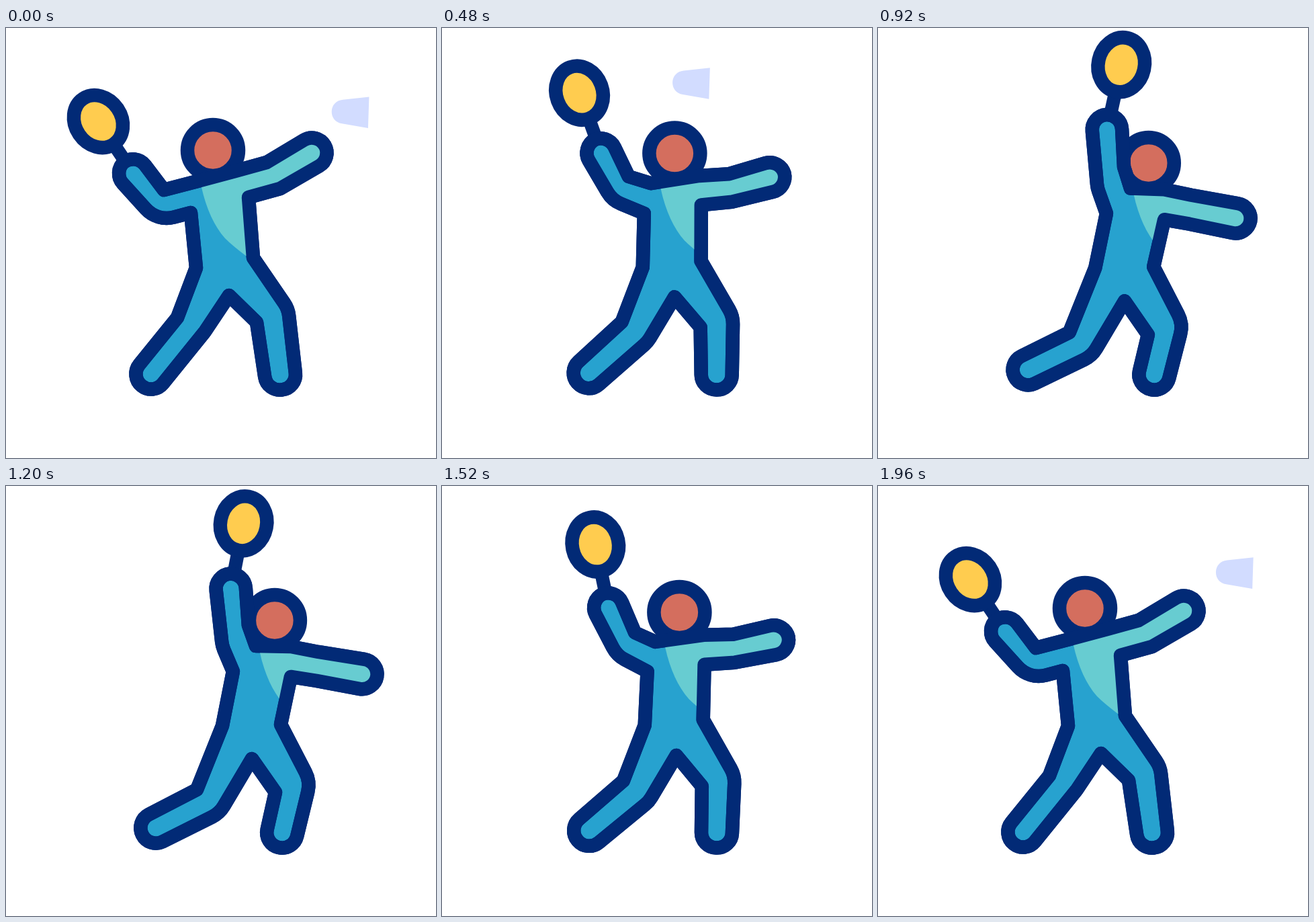
An HTML page with a canvas for the animation above (2 s loop, 640 by 640 pixels).

```html
<!DOCTYPE html>
<html lang="en">
<head>
<meta charset="utf-8">
<title>Badminton smash</title>
<style>
html, body { margin: 0; width: 100%; height: 100%; overflow: hidden; background: #fff; }
canvas { display: block; }
</style>
</head>
<body>
<canvas id="stage" width="640" height="640"></canvas>
<script>
const ctx = document.getElementById('stage').getContext('2d');
const NAVY = '#022a76', BLUE = '#27a2cf', TEAL = '#67ccd1';
const SKIN = '#d46e5e', YELLOW = '#ffcc4f', PALE = '#d2dcff';
const LOOP = 2000, LINE = 20.5, LIMB = 22.6;

// Body outline, clockwise from the inner racket elbow; then head and shade origin.
const READY = [235,241, 285,228, 341,213, 388,200, 455,186, 408,239, 361,252, 368,342,
  420,418, 408,516, 373,438, 332,398, 296,452, 216,515, 255,431, 283,357, 275,275,
  225,288, 190,217, 308,182, 291,237];
const SWING = [288,218, 318,232, 390,222, 434,221, 494,230, 436,263, 391,266, 389,348,
  436,431, 409,516, 387,447, 349,401, 308,470, 219,513, 270,439, 302,356, 306,276,
  261,252, 249,181, 354,188, 333,241];
const REACH = [361,207, 372,238, 424,239, 465,247, 530,280, 462,290, 424,284, 409,355,
  453,440, 411,516, 401,456, 366,406, 318,487, 223,509, 284,452, 322,357, 338,276,
  322,238, 335,153, 400,200, 378,248];
const VERTS = 19, HAND = 18, HEAD = 19, SHADE = 20;
const CAPS = [4, 9, 13, HAND];    // hands and feet, given by their centres
const ROUND = [8, 12, 17];        // softly bent knees and elbow

const ease = (t, from, to) => {
  const u = Math.min(1, Math.max(0, (t - from) / (to - from)));
  return u * u * (3 - 2 * u);
};
const swing = t => 1.03 * (ease(t, 180, 870) - ease(t, 1120, 1900));

// Curve through the three poses
function poseAt(q) {
  const a = (1 - q) * (1 - 2 * q), b = 4 * q * (1 - q), c = q * (2 * q - 1);
  const at = i => READY[i] * a + SWING[i] * b + REACH[i] * c;
  return Array.from({ length: READY.length / 2 }, (_, i) => [at(2 * i), at(2 * i + 1)]);
}

function bodyPath(pose) {
  const corners = [];
  for (let i = 0; i < VERTS; i++) {
    const [x, y] = pose[i];
    if (!CAPS.includes(i)) {
      corners.push([x, y, ROUND.includes(i) ? 42 : 0]);
      continue;
    }
    const p = pose[i - 1], n = pose[(i + 1) % VERTS];
    const ang = Math.atan2(y - (p[1] + n[1]) / 2, x - (p[0] + n[0]) / 2);
    const dx = Math.cos(ang) * LIMB, dy = Math.sin(ang) * LIMB;
    corners.push([x + dx + dy, y + dy - dx, LIMB], [x + dx - dy, y + dy + dx, LIMB]);
  }
  const path = new Path2D();
  path.moveTo(corners[0][0], corners[0][1]);
  corners.slice(1).forEach(([x, y, r], i) => {
    const next = corners[(i + 2) % corners.length];
    path.arcTo(x, y, next[0], next[1], r);
  });
  path.closePath();
  return path;
}

function paint(path, fill) {
  ctx.fillStyle = fill;
  ctx.fill(path);
  ctx.strokeStyle = NAVY;
  ctx.lineWidth = LINE;
  ctx.stroke(path);
}

function line(x1, y1, x2, y2, color) {
  ctx.strokeStyle = color;
  ctx.lineWidth = 20;
  ctx.beginPath();
  ctx.moveTo(x1, y1);
  ctx.lineTo(x2, y2);
  ctx.stroke();
}

function drawShuttle(t) {
  const left = LOOP - t, tilt = 0.032;
  let x, y, angle = tilt;
  if (t < 600) {
    x = 485 - 0.295 * t;
    y = 124 - 0.09 * t;
  } else if (t < 1300) {
    x = 490 + 1.06 * (t - 720);
    y = 68.5;
    angle = Math.PI - tilt;
  } else {
    x = 485 + 0.46 * left;
    y = 124 + 0.1 * left;
  }
  ctx.save();
  ctx.translate(x, y);
  ctx.rotate(angle);
  ctx.fillStyle = PALE;
  ctx.beginPath();
  ctx.moveTo(55, -23.3);
  ctx.lineTo(55, 23.3);
  ctx.lineTo(16, 17.8);
  ctx.bezierCurveTo(6, 16.5, 0, 9, 0, 0);
  ctx.bezierCurveTo(0, -9, 6, -16.5, 16, -17.8);
  ctx.fill();
  ctx.restore();
}

function drawSparks(t) {
  if (t <= 600 || t >= 818) return;
  const inner = 20 + 53 * ease(t, 648, 818), outer = 20 + 53 * ease(t, 600, 770);
  for (const deg of [204.5, 113]) {
    const c = Math.cos(deg * Math.PI / 180), s = Math.sin(deg * Math.PI / 180);
    line(246 + c * inner, 82 + s * inner, 246 + c * outer, 82 + s * outer, YELLOW);
  }
}

function drawRacket([hx, hy], t) {
  const q = swing(t < 1000 ? t - 50 : t);   // trails the arm on the way up
  const angle = (-34 + 45 * q) * Math.PI / 180, reach = 94 + 5 * q;
  const x = hx + reach * Math.sin(angle), y = hy - reach * Math.cos(angle);
  line(hx, hy, x, y, NAVY);
  const face = new Path2D();
  face.ellipse(x, y, 34.5, 40.8, angle, 0, 2 * Math.PI);
  paint(face, YELLOW);
}

function drawPlayer(pose) {
  const head = new Path2D();
  head.arc(pose[HEAD][0], pose[HEAD][1], 38, 0, 2 * Math.PI);
  paint(head, SKIN);

  const body = bodyPath(pose);
  paint(body, BLUE);
  ctx.save();
  ctx.clip(body);
  ctx.translate(...pose[SHADE]);
  ctx.fillStyle = TEAL;
  ctx.beginPath();
  ctx.moveTo(-4, -30);
  ctx.lineTo(0, 0);
  ctx.bezierCurveTo(7, 32, 19, 58, 35, 76);
  ctx.quadraticCurveTo(46, 87, 66, 102);
  ctx.lineTo(320, 102);
  ctx.lineTo(320, -100);
  ctx.lineTo(-4, -100);
  ctx.fill();
  ctx.restore();
  ctx.strokeStyle = NAVY;
  ctx.lineWidth = LINE;
  ctx.stroke(body);
}

function frame() {
  const t = performance.now() % LOOP;
  const pose = poseAt(swing(t));
  ctx.fillStyle = '#fff';
  ctx.fillRect(0, 0, 640, 640);
  ctx.lineCap = ctx.lineJoin = 'round';
  drawShuttle(t);
  drawSparks(t);
  drawRacket(pose[HAND], t);
  drawPlayer(pose);
  requestAnimationFrame(frame);
}
frame();
</script>
</body>
</html>
```
